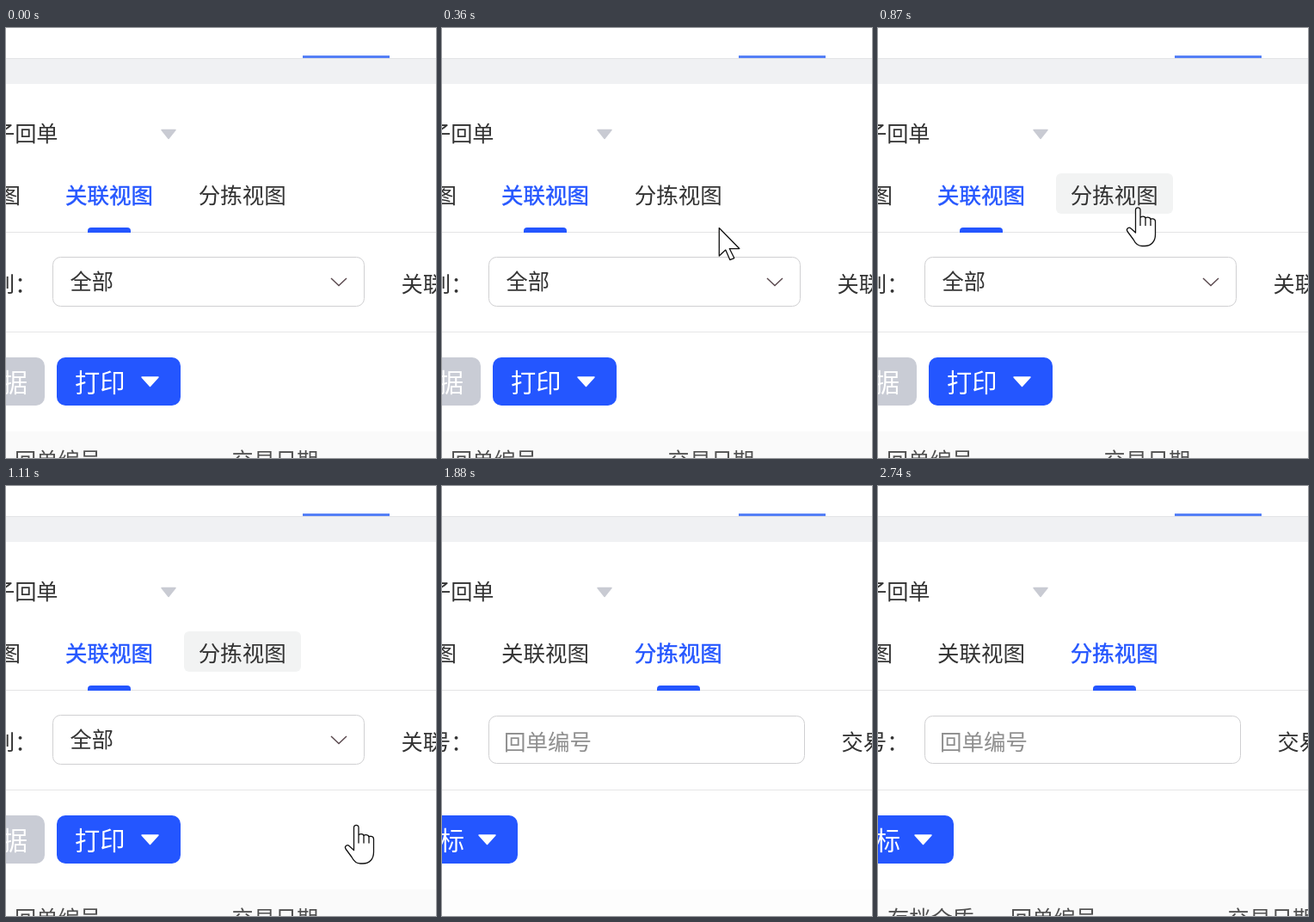
Animation, 500 px wide and 500 px high, one loop 2800 ms. Source, as an HTML page:

```html
<!DOCTYPE html>
<html lang="zh-CN">
<head>
<meta charset="utf-8">
<style>
  html, body { margin: 0; width: 100%; height: 100%; overflow: hidden; background: #fff; }
  svg { display: block; width: 100vw; height: 100vh; }
  text { font: 25.2px "Noto Sans CJK SC", "Noto Sans CJK", sans-serif; fill: #333; white-space: pre; }
  .tab { font-size: 25.5px; }
  .tab.active { fill: #2456ff; stroke: #2456ff; stroke-width: .45; }
  .button { font-size: 29.3px; fill: #fff; }
  .head { fill: #505050; }
  .hint { font-size: 25.5px; fill: #8e8e8e; }
  .field { fill: #fff; stroke: #d0d0d2; }
  .blue { fill: #2456ff; }
  .cursor { fill: #fff; stroke: #111; stroke-width: 1.3; stroke-linejoin: round; }
</style>
</head>
<body>
<svg viewBox="0 0 500 500">
  <rect width="500" height="500" fill="#fff"/>
  <rect y="35" width="500" height="30" fill="#f0f1f3"/>
  <rect y="35" width="500" height="1" fill="#e3e4e6"/>
  <rect x="345" y="32" width="101" height="3" fill="#5580f6"/>

  <text x="60.5" y="131.5" text-anchor="end">子回单</text>
  <path d="M181 118.500H197L189 128.500Z" fill="#c9cbd3" stroke="#c9cbd3" stroke-width="1.500" stroke-linejoin="round"/>

  <rect id="hover" x="207" y="169" width="136" height="47" rx="6" fill="#f2f3f3"/>
  <text class="tab" x="17" y="204" text-anchor="end">图</text>
  <text class="tab" id="linkTab" x="69" y="204">关联视图</text>
  <text class="tab" id="sortTab" x="223.7" y="204">分拣视图</text>
  <rect y="237" width="500" height="1" fill="#e4e4e5"/>
  <path id="marker" class="blue" d="M0 238V236Q0 232 4 232H46Q50 232 50 236V238Z"/>
  <rect y="353" width="500" height="1" fill="#e6e6e7"/>

  <rect id="band" y="469" width="500" height="31"/>

  <g id="linkView">
    <text x="-15" y="306.500">别：</text>
    <rect class="field" x="54.5" y="266.5" width="362" height="57" rx="9"/>
    <text x="74.5" y="303.700">全部</text>
    <path d="M378 291L387 299.500L396 291" fill="none" stroke="#5c4b50" stroke-width="1.500"/>
    <text x="459.500" y="306.500">关联</text>
    <rect x="-20" y="383" width="65" height="56" rx="10" fill="#c9ccd5"/>
    <text class="button" x="25" y="422.500" text-anchor="end">据</text>
    <rect class="blue" x="59" y="383" width="144" height="56" rx="10"/>
    <text class="button" x="80" y="422.500">打印</text>
    <path d="M158 406H177L167.500 416.500Z" fill="#fff" stroke="#fff" stroke-width="1.500" stroke-linejoin="round"/>
    <text class="head" x="10" y="511.500">回单编号</text>
    <text class="head" x="262.500" y="511.500">交易日期</text>
  </g>

  <g id="sortView">
    <text x="-15" y="306.500">号：</text>
    <rect class="field" x="54.5" y="267.5" width="367" height="55" rx="9"/>
    <text class="hint" x="72" y="306.500">回单编号</text>
    <text x="464.500" y="306.500">交易</text>
    <rect class="blue" x="-20" y="383" width="108" height="56" rx="10"/>
    <text class="button" x="26" y="422.500" text-anchor="end">标</text>
    <path d="M43 406H62L52.500 416.500Z" fill="#fff" stroke="#fff" stroke-width="1.500" stroke-linejoin="round"/>
    <g id="sortHead">
      <text class="head" x="11" y="511.500">存档介质</text>
      <text class="head" x="154" y="511.500">回单编号</text>
      <text class="head" x="406.500" y="511.500">交易日期</text>
    </g>
  </g>

  <path id="arrow" class="cursor" d="M.5 .5V33L8 26L13 37.500L18 35.500L12.500 24.500H24Z"/>
  <path id="hand" class="cursor" d="M-2.500 3.500C-2.500 0 3 0 3 3.500V13C3 10.500 9 10.500 9 13.500C9 11.500 15 11.500 15 15C15 13 20.500 13.500 20.500 17V32C20.500 40 16 45.500 8 45.500H5C0 45.500 -3 42 -5 38L-12 28.500C-14 25 -10 23 -8 25L-2.500 30ZM3 13V22M9 13.500V22M15 15V22"/>
</svg>
<script>
  const LOOP = 2800;
  const el = Object.fromEntries([...document.querySelectorAll("[id]")].map(e => [e.id, e]));
  const show = (node, on) => node.setAttribute("display", on ? "inline" : "none");
  const stepOf = (t, start, length) => Math.floor((t - start) / length + 1e-6);

  function pointer(t) {
    if (t < 30 || t >= 1370) return null;
    if (t < 870) {
      const k = Math.min(12, stepOf(t, 30, 40)), left = 1 - k / 12;
      return { x: 281 + 215 * 0.8 * left ** 1.31, y: 190 + 304 * left ** 1.8, hand: k >= 9 };
    }
    const k = stepOf(t, 870, 100 / 3);
    return { x: 302 + 20 * k - 0.714 * k * k, y: 208 + 32.8 * k - 0.9 * k * k, hand: true };
  }

  function render(t) {
    const sorted = t >= 1880;
    const p = pointer(t);
    show(el.linkView, !sorted);
    show(el.sortView, sorted);
    show(el.hover, t >= 390 && !sorted);
    el.linkTab.classList.toggle("active", !sorted);
    el.sortTab.classList.toggle("active", sorted);
    el.marker.setAttribute("transform", `translate(${sorted ? 250 : 95} 0)`);
    el.band.setAttribute("fill", sorted && t < 1990 ? "#fdfdfd" : "#fafafa");
    const fade = Math.min(4, Math.max(0, stepOf(t, 2650, 30) + 1)) / 4;
    el.sortHead.setAttribute("opacity", fade);

    show(el.arrow, p && !p.hand);
    show(el.hand, p && p.hand);
    if (p) (p.hand ? el.hand : el.arrow).setAttribute("transform", `translate(${p.x} ${p.y})`);
  }

  const start = performance.now();
  function tick() {
    render((performance.now() - start) % LOOP);
    requestAnimationFrame(tick);
  }
  render(0);
  requestAnimationFrame(tick);
</script>
</body>
</html>
```
